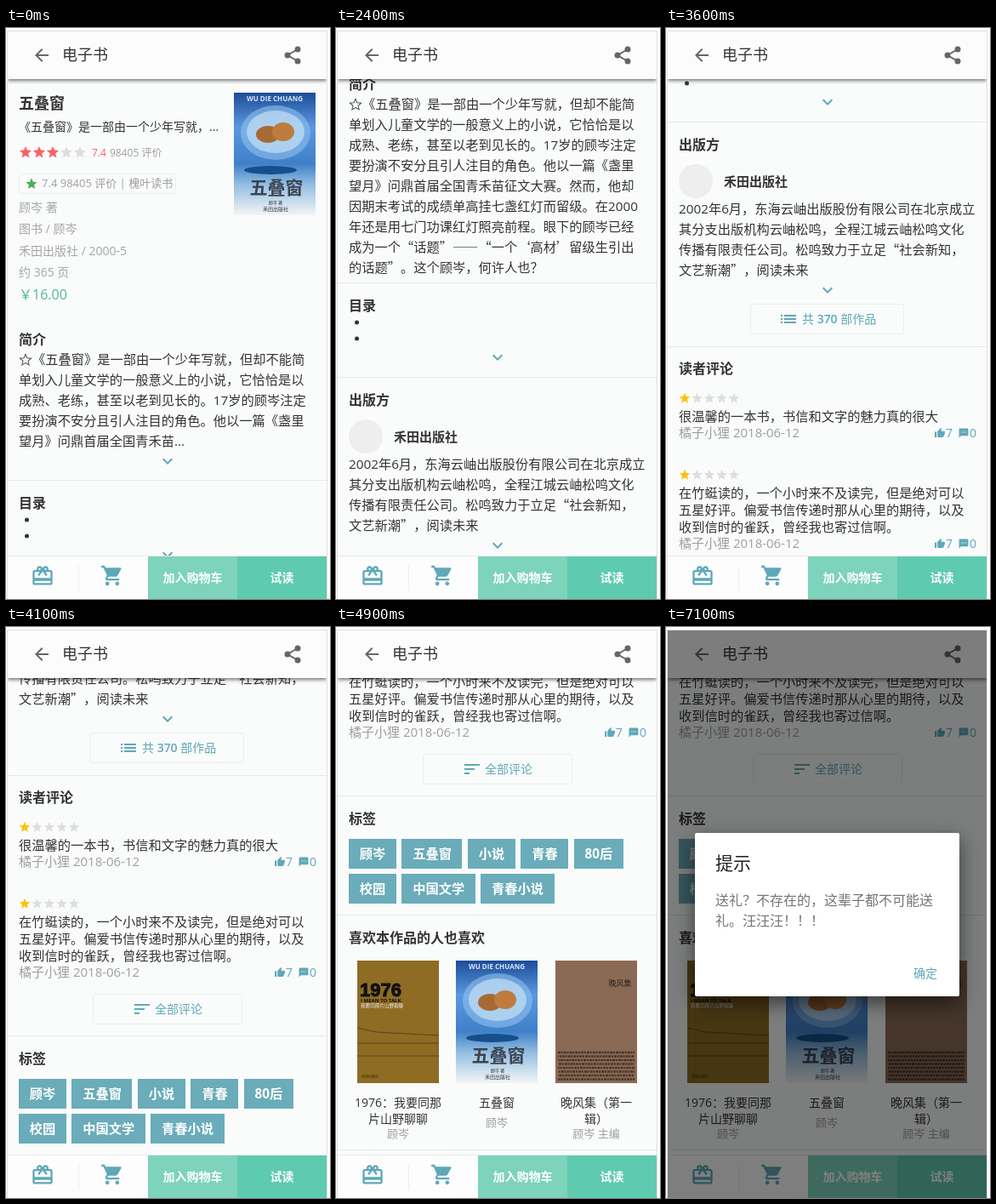
Animation, 381 px wide and 671 px high, one loop 8 s. Source, as an HTML page:

```html
<!DOCTYPE html>
<html lang="zh-CN">
<head>
<meta charset="utf-8">
<style>
html, body { margin: 0; height: 100%; overflow: hidden; background: #fdfdfb; }
svg { display: block; }
#stage { width: 100vw; height: 100vh; }
text { font-family: "Open Sans", "Noto Sans CJK SC", "Noto Sans CJK", sans-serif; text-spacing-trim: space-all; white-space: pre; }
text.cjk { font-family: "Noto Sans CJK SC", "Noto Sans CJK", sans-serif; }
</style>
</head>
<body>
<svg id="stage" viewBox="0 0 381 671"></svg>
<script>
const TEAL = '#5fa8b8', INK = '#333', GREY = '#9e9e9e', BODY = 15.25;
const AUTHOR = '顾岑', BOOK = '五叠窗', PRESS = '禾田出版社';

const ICONS = {
  back: 'M20 11H7.83l5.59-5.59L12 4l-8 8 8 8 1.41-1.41L7.83 13H20v-2z',
  star: 'M12 17.27L18.18 21l-1.64-7.03L22 9.24l-7.19-.61L12 2 9.19 8.63 2 9.24l5.46 4.73L5.82 21z',
  more: 'M16.59 8.59L12 13.17 7.41 8.59 6 10l6 6 6-6z',
  list: 'M3 13h2v-2H3zM3 17h2v-2H3zM3 9h2V7H3zM7 13h14v-2H7zM7 17h14v-2H7zM7 7v2h14V7z',
  sort: 'M3 18h6v-2H3zM3 6v2h18V6zM3 13h12v-2H3z',
  thumb: 'M1 21h4V9H1v12zm22-11c0-1.1-.9-2-2-2h-6.31l.95-4.57.03-.32c0-.41-.17-.79-.44-1.06L14.17 1 7.59 7.59C7.22 7.95 7 8.45 7 9v10c0 1.1.9 2 2 2h9c.83 0 1.54-.5 1.84-1.22l3.02-7.05c.09-.23.14-.47.14-.73v-2z',
  chat: 'M20 2H4c-1.1 0-2 .9-2 2v18l4-4h14c1.1 0 2-.9 2-2V4c0-1.1-.9-2-2-2zM9 11H7V9h2v2zm4 0h-2V9h2v2zm4 0h-2V9h2v2z',
  cart: 'M7 18c-1.1 0-2 .9-2 2s.9 2 2 2 2-.9 2-2-.9-2-2-2zM1 2v2h2l3.6 7.59-1.35 2.45c-.16.28-.25.61-.25.96 0 1.1.9 2 2 2h12v-2H7.42c-.14 0-.25-.11-.25-.25l.03-.12.9-1.63h7.45c.75 0 1.41-.41 1.75-1.03l3.58-6.49c.5-.7 0-1.48-.88-1.48H5.21l-.94-2H1zm16 16c-1.1 0-2 .9-2 2s.9 2 2 2 2-.9 2-2-.9-2-2-2z',
  gift: 'M20 6h-2.18c.11-.31.18-.65.18-1 0-1.66-1.34-3-3-3-1.05 0-1.96.54-2.5 1.35l-.5.67-.5-.68C10.96 2.54 10.05 2 9 2 7.34 2 6 3.34 6 5c0 .35.07.69.18 1H4c-1.11 0-2 .89-2 2v11c0 1.11.89 2 2 2h16c1.11 0 2-.89 2-2V8c0-1.11-.89-2-2-2zm-5-2c.55 0 1 .45 1 1s-.45 1-1 1-1-.45-1-1 .45-1 1-1zM9 4c.55 0 1 .45 1 1s-.45 1-1 1-1-.45-1-1 .45-1 1-1zm11 15H4v-2h16v2zm0-5H4V8h5.08L7 10.83 8.62 12 11 8.76l1-1.36 1 1.36L15.38 12 17 10.83 14.92 8H20v6z'
};

// All y values and icon positions are centres.
const text = (x, y, s, size = BODY, fill = INK, attrs = '') =>
  `<text x="${x}" y="${y}" dy=".34em" font-size="${size}" fill="${fill}" ${/[“”—]/.test(s) ? 'class="cjk"' : ''} ${attrs}>${s}</text>`;
const bold = (x, y, s, size = 16, fill = INK) => text(x, y, s, size, fill, 'font-weight="700"');
const mid = (x, y, s, size, fill, attrs = '') => text(x, y, s, size, fill, 'text-anchor="middle" ' + attrs);
const lines = (y, step, rows) => rows.map((s, i) => text(15, y + i * step, s)).join('');
const rect = (x, y, w, h, fill, attrs = '') =>
  `<rect x="${x}" y="${y}" width="${w}" height="${h}" fill="${fill}" ${attrs}/>`;
const oval = (x, y, rx, ry, fill, attrs = '') =>
  `<ellipse cx="${x}" cy="${y}" rx="${rx}" ry="${ry}" fill="${fill}" ${attrs}/>`;
const icon = (name, x, y, size = 24, fill = TEAL, attrs = '') =>
  `<path d="${ICONS[name]}" fill="${fill}" transform="translate(${x - size / 2} ${y - size / 2}) scale(${size / 24})" ${attrs}/>`;
const rule = y => rect(2, y, 375, 1, '#e6e9e9');
const outline = (x, y, w, h) => rect(x + .5, y + .5, w, h, 'none', 'rx="3" stroke="#eceeee"');
const stars = (x, y, gap, size, full, color) =>
  [0, 1, 2, 3, 4].map(i => icon('star', x + i * gap, y, size, i < full ? color : '#dedede')).join('');
const at = (x, y, s) => `<g transform="translate(${x} ${y})">${s}</g>`;
const clip = (y, h, s) => `<svg x="2" y="${y}" width="375" height="${h}" viewBox="2 ${y} 375 ${h}">${s}</svg>`;

const blueCover = (x, y) => at(x, y,
  rect(0, 0, 96, 144, 'url(#sky)') +
  mid(48, 7, 'WU DIE CHUANG', 8, '#dce8f5', 'font-weight="700"') +
  oval(49, 47, 41, 32, '#8fc0ee', 'opacity=".6"') + oval(49, 46, 34, 25, '#c3e0f6', 'opacity=".7"') +
  oval(40, 49, 14, 10, '#a86a33') + oval(58, 46, 13, 11, '#bd7c3d') +
  oval(43, 91, 31, 5, '#174f8d') +
  mid(50, 112, BOOK, 21, '#3b4350', 'font-weight="900"') +
  mid(49, 129, AUTHOR + ' 著', 5, INK) + mid(49, 137, PRESS, 6, INK));

const goldCover = (x, y) => at(x, y,
  rect(0, 0, 96, 144, '#8e6c24') +
  text(3, 35, '1976', 22, '#111', 'font-weight="700" stroke="#111" style="font-family:\'Liberation Sans\',sans-serif"') +
  text(4, 47, 'I MEAN TO TALK', 6, '#111', 'font-weight="700"') +
  text(4, 53, '我要同那片山野聊聊', 5.6, '#eee') +
  '<path d="M0 79L22 84L96 88M0 97H96M0 112H96" stroke="#59451b" fill="none"/>' +
  text(5, 137, PRESS, 4, '#332808'));

const brownCover = (x, y) => at(x, y,
  rect(0, 0, 96, 144, '#8b6a55') +
  mid(76, 27, '晚风集', 9, '#2b211c') +
  [0, 1, 2, 3, 4, 5, 6, 7].map(i =>
    `<path d="M3 ${108 + i * 4.5}H93" stroke="#443328" stroke-width="2.4" stroke-dasharray="3 .8 2 1" stroke-dashoffset="${i * 2}"/>`).join(''));

const review = (y, nameY, rows) =>
  stars(22, y, 14.5, 15, 1, '#ffc107') + lines(y + 21.5, 20, rows) +
  text(15, nameY, '橘子小狸 2018-06-12', 15, GREY) +
  icon('thumb', 322, nameY, 13) + text(329, nameY, '7', 14, TEAL) +
  icon('chat', 350, nameY, 13) + text(357, nameY, '0', 14, TEAL);

const tags = (y, names) => {
  let x = 15;
  return names.map(s => {
    const w = s === '80后' ? 58 : s.length * BODY + 25.5;
    const out = rect(Math.round(x), y, Math.round(w), 35, '#6aacb9') +
      mid(x + w / 2, y + 18, s, BODY, '#fff', 'font-weight="700"');
    x += w + 6.4;
    return out;
  }).join('');
};

const summary =
  bold(15, 89, BOOK, 18) +
  text(15, 116, `《${BOOK}》是一部由一个少年写就，...`, 14) +
  stars(23, 146, 16, 17, 3, '#f8616a') +
  text(101, 146.5, '7.4', 12, '#f8616a') + text(122, 146.5, '98405 评价', 12, GREY) +
  outline(15, 171, 184, 23) + icon('star', 30, 183, 16, '#4caf50') +
  text(42, 183, '7.4 98405 评价 | 槐叶读书', 13, GREY) +
  [AUTHOR + ' 著', '图书 / ' + AUTHOR, PRESS + ' / 2000-5', '约 365 页']
    .map((s, i) => text(15, 211.5 + i * 25.2, s, 14, '#a6a6a6')).join('') +
  text(15, 314, '￥16.00', 16, '#4fb79c') +
  blueCover(268, 76);

const intro =
  bold(15, 367, '简介') +
  icon('star', 23, 390, 16, 'none', 'stroke="#555" stroke-width="1.6"') +
  text(31, 389.5, `《${BOOK}》是一部由一个少年写就，但却不能简`) +
  lines(413.5, 24, ['单划入儿童文学的一般意义上的小说，它恰恰是以',
    `成熟、老练，甚至以老到见长的。17岁的${AUTHOR}注定`,
    '要扮演不安分且引人注目的角色。他以一篇《盏里']) +
  `<g id="short">${text(15, 485.5, '望月》问鼎首届全国青禾苗...')}${icon('more', 190, 509)}</g>` +
  '<g id="full">' + lines(485.5, 24, ['望月》问鼎首届全国青禾苗征文大赛。然而，他却',
    '因期末考试的成绩单高挂七盏红灯而留级。在2000',
    `年还是用七门功课红灯照亮前程。眼下的${AUTHOR}已经`,
    '成为一个“话题”——“一个‘高材’留级生引出',
    `的话题”。这个${AUTHOR}，何许人也？`]) + '</g>';

const rest =
  rule(599) + bold(15, 627, '目录') +
  oval(24.5, 646, 2.5, 2.5, INK) + oval(24.5, 665, 2.5, 2.5, INK) +
  icon('more', 190, 687) +
  rule(710) + bold(15, 738, '出版方') +
  oval(35, 780, 20, 20, '#eee') + bold(68, 780.5, PRESS, 15) +
  lines(812.5, 24, ['2002年6月，东海云岫出版股份有限公司在北京成立',
    '其分支出版机构云岫松鸣，全程江城云岫松鸣文化',
    '传播有限责任公司。松鸣致力于立足“社会新知，',
    '文艺新潮”，阅读未来']) +
  icon('more', 190, 908) +
  outline(99, 924, 180, 35) + icon('list', 144, 942) +
  text(160, 942, '共 <tspan font-weight="600">370</tspan> 部作品', 14, TEAL) +
  rule(974) + bold(15, 1001, '读者评论') +
  review(1035, 1076, ['很温馨的一本书，书信和文字的魅力真的很大']) +
  review(1125, 1206, ['在竹蜓读的，一个小时来不及读完，但是绝对可以',
    '五星好评。偏爱书信传递时那从心里的期待，以及',
    '收到信时的雀跃，曾经我也寄过信啊。']) +
  outline(102, 1231, 175, 35) + icon('sort', 160, 1249) + text(175, 1249, '全部评论', 14, TEAL) +
  rule(1280) + bold(15, 1308, '标签') +
  tags(1331, [AUTHOR, BOOK, '小说', '青春', '80后']) +
  tags(1372, ['校园', '中国文学', '青春小说']) +
  rule(1420) + bold(15, 1448, '喜欢本作品的人也喜欢') +
  goldCover(25, 1474) + blueCover(141, 1474) + brownCover(258, 1474) +
  mid(73, 1641, '1976：我要同那', 14, INK) + mid(73, 1660, '片山野聊聊', 14, INK) + mid(73, 1678, AUTHOR, 13, GREY) +
  mid(189, 1641, BOOK, 14, INK) + mid(189, 1665, AUTHOR, 13, GREY) +
  mid(306, 1641, '晚风集（第一', 14, INK) + mid(306, 1660, '辑）', 14, INK) + mid(306, 1678, AUTHOR + ' 主编', 13, GREY) +
  rule(1696);

const header =
  rect(2, 4, 375, 56, '#fcfcfc', 'style="filter:drop-shadow(0 2px 2px #0008)"') +
  icon('back', 42, 32, 24, '#666') + text(66, 32, '电子书', 18) +
  '<g fill="#666" stroke="#666" stroke-width="2"><path d="M343 25L331 32L343 39" fill="none"/>' +
  [[343, 25], [331, 32], [343, 39]].map(([x, y]) => oval(x, y, 2.5, 2.5, '#666')).join('') + '</g>';

const footer =
  rect(2, 620, 375, 51, '#fdfdfd') + rect(2, 620, 375, 1, '#e8ebeb') +
  rect(85, 632, 1, 30, '#eee') +
  icon('gift', 43, 644, 28) + icon('cart', 125, 643.5, 28) +
  rect(167, 621, 105, 50, '#7dd3bb') + rect(272, 621, 105, 50, '#5ecab0') +
  mid(219.5, 646, '加入购物车', 14, '#fff', 'font-weight="700"') +
  mid(324.5, 646, '试读', 14, '#fff', 'font-weight="700"');

const dialog =
  rect(34, 242, 311, 192, '#fff', 'rx="2" style="filter:drop-shadow(0 8px 11px #0008)"') +
  text(58, 277.5, '提示', 21, '#222') +
  text(58, 321.5, '送礼？不存在的，这辈子都不可能送', 16, '#757575') +
  text(58, 345.5, '礼。汪汪汪！！！', 16, '#757575') +
  text(291, 407.5, '确定', 14, TEAL);

const $ = id => document.getElementById(id);
$('stage').innerHTML =
  `<defs><linearGradient id="sky" x2="0" y2="1">
    <stop stop-color="#1c4c98"/><stop offset=".28" stop-color="#5b98df"/>
    <stop offset=".58" stop-color="#3f80c8"/><stop offset=".74" stop-color="#8fbbe0"/>
    <stop offset="1" stop-color="#f3f5f7"/></linearGradient></defs>` +
  rect(1.5, 3.5, 376, 670, '#fafbfb', 'stroke="#e0e0dc"') +
  clip(60, 560, `<g id="page">${summary}${intro}<g id="rest">${rest}</g></g>`) +
  clip(4, 667, header + footer +
    `<g id="shade">${rect(2, 4, 375, 667, '#000')}</g><g id="dialog">${dialog}</g>`);

// start, end, distance
const SCROLLS = [[1200, 1600, 300], [2800, 3100, 200], [3300, 3600, 100],
  [3700, 4100, 200], [4200, 4400, 100], [4600, 4900, 182]];
const progress = (t, a, b) => Math.min(1, Math.max(0, (t - a) / (b - a)));
const smooth = p => p * p * (3 - 2 * p);
const quart = p => p < .5 ? 8 * p ** 4 : 1 - 8 * (1 - p) ** 4;

function draw(now) {
  const t = Math.floor(now % 8000 / 100) * 100; // the screen refreshes ten times a second
  const top = SCROLLS.reduce((sum, [a, b, d]) => sum + d * smooth(progress(t, a, b)), 0);
  const open = t >= 2400;
  const pop = quart(progress(t, 6800, 7100));
  $('page').setAttribute('transform', `translate(0 ${-Math.round(top)})`);
  $('rest').setAttribute('transform', `translate(0 ${open ? 0 : -68})`);
  $('short').setAttribute('display', open ? 'none' : 'inline');
  $('full').setAttribute('display', open ? 'inline' : 'none');
  $('shade').setAttribute('opacity', pop * .5);
  $('dialog').setAttribute('opacity', pop ** 1.4);
}

const start = performance.now();
const tick = () => {
  draw(performance.now() - start);
  requestAnimationFrame(tick);
};
tick();
</script>
</body>
</html>
```
